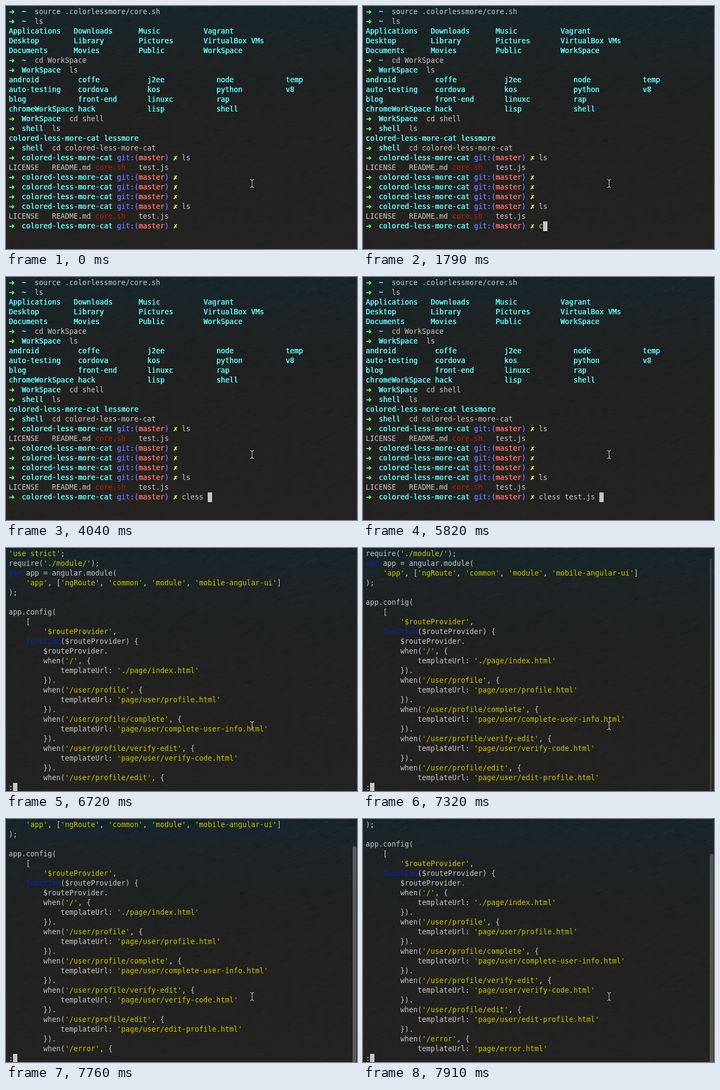
These frames come from a looping animation (649 px wide and 449 px high, 8 s). An HTML page with a canvas:

```html
<!DOCTYPE html>
<html lang="en">
<head>
<meta charset="utf-8">
<title>Terminal session</title>
<style>
  html, body { margin: 0; width: 100%; height: 100%; overflow: hidden; background: #222220; }
  canvas { display: block; }
</style>
</head>
<body>
<canvas id="stage" width="649" height="449"></canvas>
<script>
const W = 649, H = 449, LOOP = 8000;
const CELL = 8, LINE = 18, LEFT = 5, TOP = 2;
const ctx = document.getElementById('stage').getContext('2d');
const MONO = '13.29px "DejaVu Sans Mono", monospace';
const ARROW = '13px "DejaVu Sans", sans-serif';
const GREY = '#c7c7c7', GREEN = '#5ff967', CYAN = '#60fdff', BLUE = '#6871ff',
      PINK = '#ff6d67', LEMON = '#fefb67', RED = '#c91b00', STRING = '#c7c400',
      KEYWORD = '#0225c7', DARK = '#222220';

const cellX = col => LEFT + col * CELL;
const cellY = row => TOP + row * LINE;

function put(row, col, text, color = GREY, bold = false, font = MONO) {
  ctx.font = font;
  ctx.fillStyle = color;
  ctx.fillText(text, cellX(col), cellY(row) + 13);
  if (bold) ctx.fillText(text, cellX(col) + 0.6, cellY(row) + 13);
}

function block(row, col, width = 1) {
  ctx.fillStyle = GREY;
  ctx.fillRect(cellX(col), cellY(row), width * CELL, LINE);
}

// Dark sand: a teal edge fading into warm grey, with faint seeded ripples that thin out downwards.
function paintBackground() {
  const canvas = document.createElement('canvas');
  canvas.width = W;
  canvas.height = H;
  const c = canvas.getContext('2d');
  const shade = c.createLinearGradient(0, 0, 0, H);
  shade.addColorStop(0, '#16262c');
  shade.addColorStop(0.12, '#1c2426');
  shade.addColorStop(0.3, '#1f2222');
  shade.addColorStop(0.6, '#222220');
  shade.addColorStop(1, '#242321');
  c.fillStyle = shade;
  c.fillRect(0, 0, W, H);
  let seed = 7;
  const random = () => (seed = seed * 16807 % 2147483647) / 2147483647;
  for (let i = 0; i < 1500; i++) {
    const x = random() * W, y = random() ** 1.5 * H, length = 4 + random() * 9;
    c.strokeStyle = i % 2 ? 'rgba(8,10,12,.2)' : 'rgba(110,120,120,.08)';
    c.beginPath();
    c.moveTo(x, y);
    c.quadraticCurveTo(x + length / 2, y - 1, x + length, y - length * 0.35);
    c.stroke();
  }
  return canvas;
}
const background = paintBackground();

function prompt(row, dir, command) {
  put(row, 0, '➜', GREEN, true, ARROW);
  put(row, 3, dir, CYAN, true);
  put(row, 5 + dir.length, command);
}

function gitPrompt(row, command = '') {
  prompt(row, 'colored-less-more-cat', '');
  put(row, 25, 'git:(', BLUE, true);
  put(row, 30, 'master', PINK, true);
  put(row, 36, ')', BLUE, true);
  put(row, 38, '✗', LEMON, true);
  put(row, 40, command);
}

function folders(row, width, names) {
  names.split(' ').forEach((name, i) => put(row, i * width, name.replace('_', ' '), CYAN, true));
}

function files(row) {
  put(row, 0, 'LICENSE');
  put(row, 10, 'README.md');
  put(row, 20, 'core.sh', RED);
  put(row, 30, 'test.js');
}

function drawShell({ text, cursor, menu }) {
  prompt(0, '~', 'source .colorlessmore/core.sh');
  prompt(1, '~', 'ls');
  folders(2, 15, 'Applications Downloads Music Vagrant');
  folders(3, 15, 'Desktop Library Pictures VirtualBox_VMs');
  folders(4, 15, 'Documents Movies Public WorkSpace');
  prompt(5, '~', 'cd WorkSpace');
  prompt(6, 'WorkSpace', 'ls');
  folders(7, 16, 'android coffe j2ee node temp');
  folders(8, 16, 'auto-testing cordova kos python v8');
  folders(9, 16, 'blog front-end linuxc rap');
  folders(10, 16, 'chromeWorkSpace hack lisp shell');
  prompt(11, 'WorkSpace', 'cd shell');
  prompt(12, 'shell', 'ls');
  folders(13, 22, 'colored-less-more-cat lessmore');
  prompt(14, 'shell', 'cd colored-less-more-cat');
  gitPrompt(15, 'ls');
  files(16);
  for (let row = 17; row < 20; row++) gitPrompt(row);
  gitPrompt(20, 'ls');
  files(21);
  gitPrompt(22, text);
  if (cursor) block(22, 40 + text.length);
  if (menu !== undefined) {
    ['clear', 'cless'].forEach((name, i) => {
      const selected = menu === i;
      if (selected) block(23, i * 7, 5);
      put(23, i * 7, name, selected ? DARK : GREY);
    });
  }
}

const route = (path, page) => [
  `        when('${path}', {`,
  `            templateUrl: '${page}'`,
  '        }).'
];
const code = [
  "'use strict';",
  "require('./module/');",
  'var app = angular.module(',
  "    'app', ['ngRoute', 'common', 'module', 'mobile-angular-ui']",
  ');',
  '',
  'app.config(',
  '    [',
  "        '$routeProvider',",
  '    function($routeProvider) {',
  '        $routeProvider.',
  ...route('/', './page/index.html'),
  ...route('/user/profile', 'page/user/profile.html'),
  ...route('/user/profile/complete', 'page/user/complete-user-info.html'),
  ...route('/user/profile/verify-edit', 'page/user/verify-code.html'),
  ...route('/user/profile/edit', 'page/user/edit-profile.html'),
  ...route('/error', 'page/error.html')
];

function drawCodeLine(row, line) {
  for (const { 0: token, index } of line.matchAll(/'[^']*'|\b(?:var|function)\b|[^'\s]+/g)) {
    const color = token[0] === "'" ? STRING : /^(var|function)$/.test(token) ? KEYWORD : GREY;
    put(row, index, token, color);
  }
}

function drawPager({ scroll, bar }) {
  code.slice(scroll, scroll + 24).forEach((line, row) => drawCodeLine(row, line));
  put(24, 0, ':');
  block(24, 1);
  if (bar) {
    // The thumb shrinks as scrolled lines join the 25 visible rows.
    const top = H * scroll / (25 + scroll) + 2;
    ctx.fillStyle = `rgba(255,255,255,${bar})`;
    ctx.beginPath();
    ctx.roundRect(641, top, scroll === 1 ? 4 : 7, H - top, [3.5, 3.5, 0, 0]);
    ctx.fill();
  }
}

function drawPointer() {
  const beam = new Path2D('M451.5 320.5Q454.5 320.5 455 323Q455.5 320.5 458.5 320.5' +
    'M455 323V333M451.5 335.5Q454.5 335.5 455 333Q455.5 335.5 458.5 335.5');
  ctx.strokeStyle = 'rgba(20,20,20,.8)';
  ctx.lineWidth = 2.6;
  ctx.stroke(beam);
  ctx.strokeStyle = '#d8d8d8';
  ctx.lineWidth = 1.1;
  ctx.stroke(beam);
}

const steps = [
  { at: 0, text: '' },
  { at: 890, text: '', cursor: true },
  { at: 1790, text: 'c', cursor: true },
  { at: 1940, text: 'cl', cursor: true },
  { at: 2090, text: 'cle', cursor: true },
  { at: 2390, text: 'cle', cursor: true, menu: -1 },
  { at: 3140, text: 'clear', cursor: true, menu: 0 },
  { at: 3440, text: 'cless', cursor: true, menu: 1 },
  { at: 4040, text: 'cless ', cursor: true },
  { at: 4930, text: 'cless ' },
  { at: 5530, text: 'cless te', cursor: true },
  { at: 5820, text: 'cless test.js ', cursor: true },
  { at: 6270 },
  { at: 6720, scroll: 0 },
  { at: 7320, scroll: 1, bar: 0.12 },
  { at: 7470, scroll: 2, bar: 0.27 },
  { at: 7620, scroll: 2, bar: 0.25 },
  { at: 7760, scroll: 3, bar: 0.25 },
  { at: 7910, scroll: 4, bar: 0.22 }
];

function frame() {
  const time = performance.now() % LOOP;
  const step = steps.findLast(s => s.at <= time);
  ctx.drawImage(background, 0, 0);
  if (step.text !== undefined) drawShell(step);
  else if (step.scroll !== undefined) drawPager(step);
  else block(0, 0);
  drawPointer();
  requestAnimationFrame(frame);
}
frame();
</script>
</body>
</html>
```
